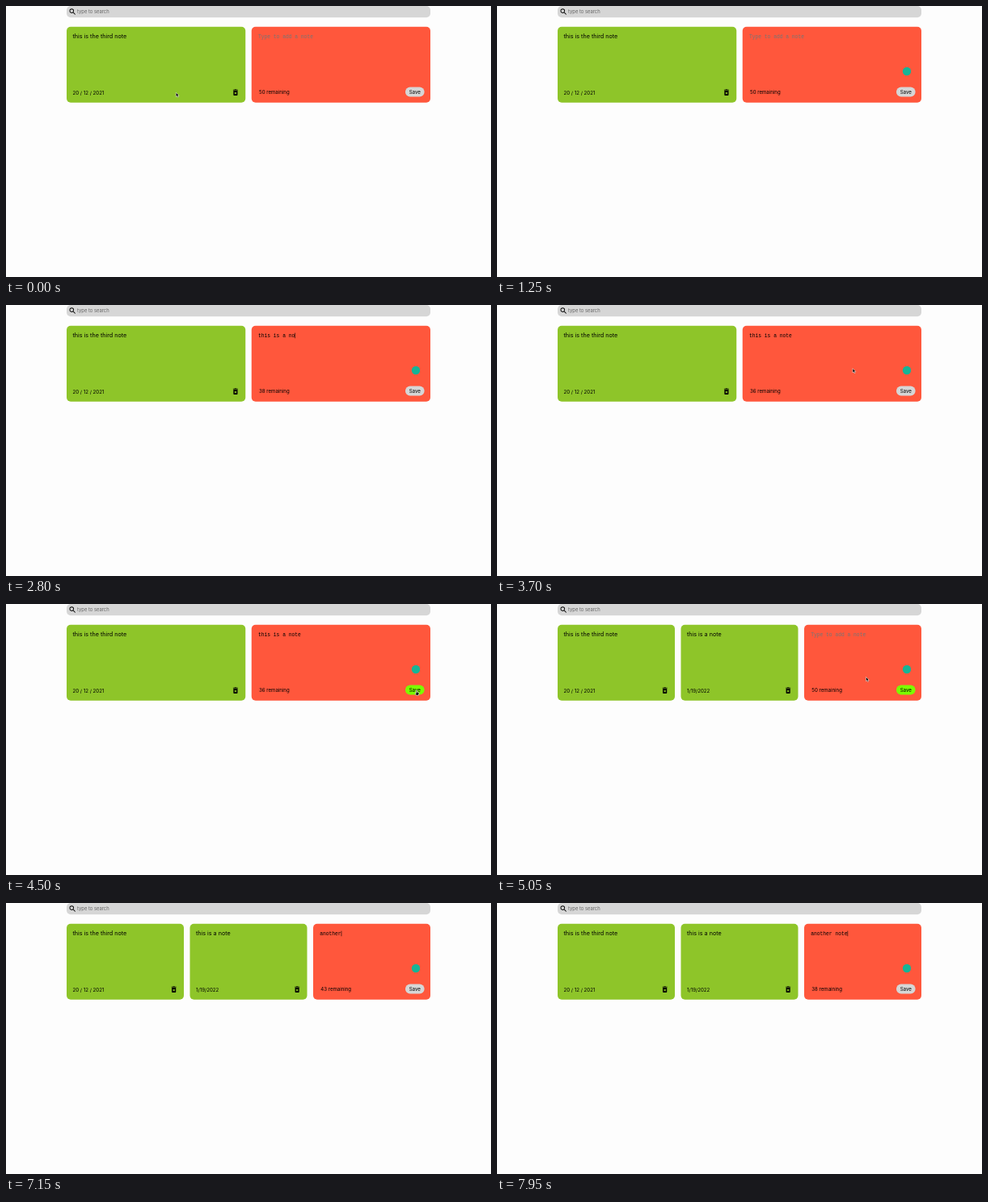
Write an HTML page that moves like this. It is 600 by 336 pixels and loops after 8 s.

```html
<!DOCTYPE html>
<html lang="en">
<head>
<meta charset="utf-8">
<title>Notes</title>
<style>
  html, body { margin: 0; width: 100%; height: 100%; overflow: hidden; background: #fdfdfd; }
  svg { display: block; width: 600px; height: 336px; }
  text { font: 6.1px Inter, sans-serif; white-space: pre; }
  .note { font-size: 7.2px; }
  .search { font-size: 5.85px; fill: #666; }
  .entry { font: 6.3px "Liberation Mono", monospace; }
</style>
</head>
<body>
<svg viewBox="0 0 600 336">
  <defs>
    <path id="bin" transform="scale(.43)" d="M6 19c0 1.1.9 2 2 2h8c1.1 0 2-.9 2-2V7H6v12zm2.46-7.12 1.41-1.41L12 12.59l2.12-2.12 1.41 1.41L13.41 14l2.12 2.12-1.41 1.41L12 15.41l-2.12 2.12-1.41-1.41L10.59 14l-2.13-2.12zM15.5 4l-1-1h-5l-1 1H5v2h14V4z"/>
  </defs>
  <rect x="75" y="0" width="450" height="14.3" rx="5" fill="#d6d6d6"/>
  <path transform="translate(77.2 2) scale(.43)" d="M15.5 14h-.79l-.28-.27A6.47 6.47 0 0 0 16 9.5 6.5 6.5 0 1 0 9.5 16c1.61 0 3.09-.59 4.23-1.57l.27.28v.79l5 4.99L20.49 19l-4.99-5zm-6 0C7.01 14 5 11.99 5 9.5S7.01 5 9.5 5 14 7.01 14 9.5 11.99 14 9.5 14z"/>
  <text class="search" x="88" y="9.2">type to search</text>

  <g id="cards"></g>

  <g id="editor">
    <rect id="paper" y="25.8" height="94" rx="5" fill="#ff573c"/>
    <text id="entry" class="entry" x="8.2" y="40"></text>
    <rect id="caret" y="34.6" width=".6" height="6.6"/>
    <text id="remaining" x="9.3" y="108.6"></text>
  </g>
  <rect id="save" x="494" y="100.6" width="23.6" height="11.8" rx="5.9"/>
  <text x="505.8" y="108.7" text-anchor="middle" style="font-size:6.2px">Save</text>
  <circle id="badge" cx="507" cy="81" r="5.2" fill="#16b496"/>

  <path id="arrow" d="M0 0V5.2L1.2 4.1 2 6 3 5.6 2.2 3.8H3.8Z" stroke="#fff" stroke-width=".5"/>
  <path id="hand" d="M-.6 .2Q0-.5 .6 .2V2.2L2.6 2.7Q3.1 3 2.9 4L2.3 6.2H-.5L-2 3.8Q-1.7 3-.6 3.8Z" stroke="#fff" stroke-width=".6"/>
</svg>
<script>
const LOOP = 8000, GAP = 7.5, LIMIT = 50;
const SAVED_AT = 4700;
const notes = [
  ["this is the third note", "20 / 12 / 2021"],
  ["this is a note", "1/19/2022"]
];
const drafts = [
  { text: "this is a note", start: 1300, step: 122 },
  { text: "another note", start: 6090, step: 150 }
];
// Pointer stops: time, x, y
const moves = [
  [[0, 210.3, 107.3], [150, 210.3, 107.3], [850, 350, 60]],
  [[3350, 400, 62], [4200, 508, 107], [4750, 508, 107], [5050, 456.5, 90.5], [5400, 425, 60]]
];
const el = id => document.getElementById(id);
const show = (id, on) => el(id).setAttribute("visibility", on ? "visible" : "hidden");
const ease = u => u * u * (3 - 2 * u);

function pointerAt(t) {
  const path = moves.find(p => t >= p[0][0] && t < p.at(-1)[0]);
  if (!path) return null;
  const i = path.findIndex(stop => stop[0] > t);
  const [a, b] = [path[i - 1], path[i]];
  const u = ease((t - a[0]) / (b[0] - a[0]));
  return [a[1] + (b[1] - a[1]) * u, a[2] + (b[2] - a[2]) * u];
}

let shownNotes = 0;
function layOut(count) {
  if (count === shownNotes) return;
  shownNotes = count;
  const width = (450 - GAP * count) / (count + 1);
  el("cards").innerHTML = notes.slice(0, count).map(([text, date], i) => `
    <g transform="translate(${75 + i * (width + GAP)})">
      <rect y="25.8" width="${width}" height="94" rx="5" fill="#8ec529"/>
      <text class="note" x="7.4" y="40.1">${text}</text>
      <text x="7.6" y="109.5">${date}</text>
      <use href="#bin" x="${width - 17.5}" y="102"/>
    </g>`).join("");
  el("paper").setAttribute("width", width);
  el("editor").setAttribute("transform", `translate(${525 - width})`);
}

function draw(t) {
  const saved = t >= SAVED_AT;
  layOut(saved ? 2 : 1);

  const draft = drafts[+saved];
  const typed = Math.max(0, Math.min(draft.text.length, Math.floor((t - draft.start) / draft.step)));
  el("entry").textContent = typed ? draft.text.slice(0, typed) : "Type to add a note";
  el("entry").setAttribute("fill", typed ? "#000" : "#757575");
  el("remaining").textContent = `${LIMIT - typed} remaining`;

  const end = draft.start + draft.step * draft.text.length;
  const typing = typed > 0 && t < end + 500;
  const blink = !typed && t > 950 && !saved && t % 1000 < 200;
  el("caret").setAttribute("x", 8.2 + typed * 3.78);
  show("caret", typing || blink);
  show("badge", t >= 950);

  const pointer = pointerAt(t);
  const overSave = pointer && pointer[0] > 494 && pointer[1] > 100.6;
  const lit = overSave || (t >= SAVED_AT && t < 5100);
  el("save").setAttribute("fill", lit ? "#7cfc00" : "#d6d6d6");
  show("arrow", pointer && !overSave);
  show("hand", overSave);
  if (pointer) el(overSave ? "hand" : "arrow").setAttribute("transform", `translate(${pointer})`);
}

function frame() {
  draw(performance.now() % LOOP);
  requestAnimationFrame(frame);
}
frame();
</script>
</body>
</html>
```
